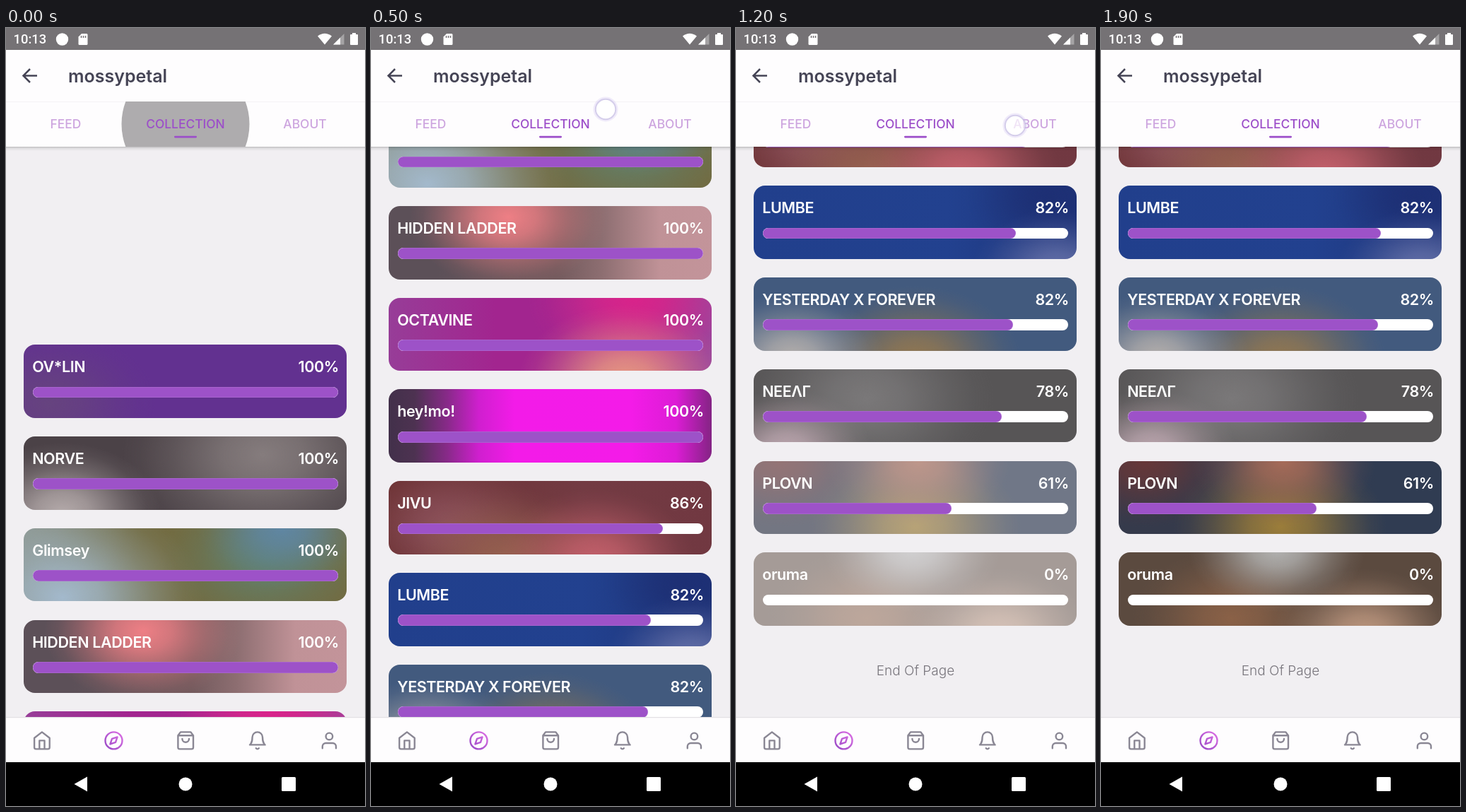
An HTML page for the animation above (2 s loop, 508x1101 px).

```html
<!DOCTYPE html>
<html lang="en">
<head>
<meta charset="utf-8">
<title>Collection</title>
<style>
  html, body { margin: 0; width: 100%; height: 100%; overflow: hidden; background: #f1eff2; }
  body { position: relative; font-family: Inter, sans-serif; }
  #list { position: absolute; left: 0; top: 0; width: 508px; }
  .card { position: absolute; left: 25.2px; width: 457.3px; height: 103.6px; color: #fff; font: 600 21.5px/30px Inter, sans-serif; letter-spacing: -.4px; }
  .card > * { position: absolute; }
  .art { inset: 0; border-radius: 16px; }
  .name { left: 12px; top: 16px; white-space: pre; }
  .percent { right: 11.5px; top: 16px; }
  .track, .fill { left: 12.5px; top: 59.3px; width: 432.6px; height: 15.8px; border-radius: 8px; }
  .track { background: #fff; }
  .fill { background: #9d52c8; box-shadow: inset 0 0 0 .6px rgba(255, 255, 255, .2); }
  #end { position: absolute; width: 508px; top: 2028px; text-align: center; font: 300 19px/30px Inter, sans-serif; color: #77747b; }
  svg { position: absolute; left: 0; top: 0; }
  .icon { fill: none; stroke: #8a8794; stroke-width: 2; stroke-linecap: round; stroke-linejoin: round; }
  .tab { font: 500 17.4px Inter, sans-serif; text-anchor: middle; fill: #cda5df; }
</style>
</head>
<body>
<div id="list"></div>
<svg width="508" height="1101" viewBox="0 0 508 1101">
  <defs>
    <linearGradient id="shade" x2="0" y2="1">
      <stop stop-opacity=".22"/><stop offset=".35" stop-opacity=".08"/><stop offset="1" stop-opacity="0"/>
    </linearGradient>
    <linearGradient id="violet" x1="0" y1="1" x2="1" y2="0">
      <stop stop-color="#9748c5"/><stop offset="1" stop-color="#dd70e4"/>
    </linearGradient>
    <clipPath id="tabClip"><path d="M0 104H508V168H0z"/></clipPath>
  </defs>

  <!-- status bar -->
  <path fill="#757275" d="M0 0H508V31H0z"/>
  <g fill="#fff">
    <text x="10.5" y="22.3" style="font:500 18.4px Roboto,sans-serif">10:13</text>
    <circle cx="79.5" cy="16" r="8.7"/>
    <path d="M107 8h7q1.5 0 1.5 1.5v13q0 1.5-1.5 1.5h-10q-1.5 0-1.5-1.5v-10z"/>
    <path d="M441 11.5Q451 4 461 11.5L451 23.5z"/>
    <path fill-opacity=".35" d="M478.5 8V23.5H463z"/>
    <path d="M473 13.5V23.5H463z"/>
    <path d="M490 7h5v2h2q1 0 1 1v13q0 1-1 1h-9q-1 0-1-1v-13q0-1 1-1h2z"/>
  </g>
  <path stroke="#757275" stroke-width="1.5" d="M106.5 11v3M109.5 11v3M112.5 11v3"/>

  <!-- header and tabs -->
  <path fill="#fefdfe" d="M0 31H508V168H0z"/>
  <path fill="#f5f3f6" d="M0 104H508V105H0z"/>
  <path fill="url(#shade)" d="M0 168H508V174H0z"/>
  <path fill="none" stroke="#454455" stroke-width="2.5" d="M44 67.5H25M34 58l-9.5 9.5 9.5 9.5"/>
  <text x="88" y="77" fill="#454455" style="font:600 25px Inter,sans-serif">mossypetal</text>
  <circle id="ripple" cx="254" cy="136" r="90.5" fill="#aeacae" clip-path="url(#tabClip)"/>
  <text class="tab" x="84.5" y="142">FEED</text>
  <text class="tab" x="254" y="142" style="fill:#9c4ec9">COLLECTION</text>
  <text class="tab" x="423" y="142">ABOUT</text>
  <rect x="238" y="152.8" width="32" height="2.6" rx="1.3" fill="#9c4ec9"/>

  <!-- bottom navigation -->
  <path fill="#fefdfe" d="M0 976H508V1039H0z"/>
  <path fill="#e2e0e4" d="M0 975H508V976.2H0z"/>
  <g class="icon">
    <path transform="translate(36.5 994) scale(1.2)" d="M3 9l9-7 9 7v11a2 2 0 0 1-2 2H5a2 2 0 0 1-2-2zM9 22V12h6v10"/>
    <path transform="translate(138.1 994) scale(1.2)" stroke="url(#violet)" d="M2 12a10 10 0 1 0 20 0a10 10 0 1 0-20 0M16.2 7.8l-2.1 6.3-6.3 2.1 2.1-6.3z"/>
    <path transform="translate(239.8 994) scale(1.2)" d="M6 2L3 6v14a2 2 0 0 0 2 2h14a2 2 0 0 0 2-2V6l-3-4zM3 6h18M16 10a4 4 0 0 1-8 0"/>
    <path transform="translate(341.4 994) scale(1.2)" d="M18 8A6 6 0 0 0 6 8c0 7-3 9-3 9h18s-3-2-3-9M13.7 21a2 2 0 0 1-3.4 0"/>
    <path transform="translate(443 994) scale(1.2)" d="M20 21v-2a4 4 0 0 0-4-4H8a4 4 0 0 0-4 4v2M8 7a4 4 0 1 0 8 0a4 4 0 1 0-8 0"/>
  </g>
  <path d="M0 1039H508V1101H0z"/>
  <path fill="#fff" d="M96.5 1070L115 1059.5V1080.5z"/>
  <circle cx="254" cy="1070" r="9.5" fill="#fff"/>
  <rect x="390" y="1060" width="20" height="20" rx="1.5" fill="#fff"/>

  <g id="touch">
    <circle r="16" fill="none" stroke="#cdbfee" stroke-opacity=".3" stroke-width="3"/>
    <circle r="14.2" fill="#fff" fill-opacity=".7" stroke="#c4bce2" stroke-opacity=".7" stroke-width="2"/>
  </g>
</svg>
<script>
const $ = id => document.getElementById(id);

// name, progress, base background, then soft blobs as "x% y% radius colour"
const groups = [
  ["OV*LIN", 1, "#623190", "8 80 150 #66437f"],
  ["NORVE", 1, "#4b4247", "12 105 140 #b5abab", "74 25 200 #857c7d"],
  ["Glimsey", 1, "#726b41", "80 0 120 #5f86a3", "75 40 150 #61806c", "12 95 200 #a3b9cc", "0 0 170 #8a938a"],
  ["HIDDEN LADDER", 1, "linear-gradient(90deg,#5c5058 15%,#735a5d 52%,#8d6e71 66%,#c09297 84%,#c3949a)", "37 15 140 #ee7f85"],
  ["OCTAVINE", 1, "linear-gradient(90deg,#973d98,#a2258f 33%,#a2258f 50%,#ab3492 80%,#9c459c)", "73 115 150 #e89a80", "76 0 150 #d9238a"],
  ["hey!mo!", 1, "linear-gradient(90deg,#42304a,#4d3251 8%,#872a88 18%,#d01fcf 28%,#f31be8 39%,#f41be8 75%,#dc1cd5 89%,#842484)"],
  ["JIVU", .868, "linear-gradient(90deg,#6a3031,#733b43 60%,#713841)", "64 108 140 #c3606b", "36 105 140 #95604f", "18 60 140 #8b505a"],
  ["LUMBE", .829, "linear-gradient(90deg,#213f8c,#22418f 60%,#1e3479)", "94 115 120 #6470a8", "92 15 120 #1d2f74"],
  ["YESTERDAY X FOREVER", .82, "#425a7e", "12 110 130 #b5b0ad", "50 115 150 #94784f"],
  ["NEE\u039b\u0393", .781, "#575556", "10 112 120 #bda7b0", "35 40 180 #7a7879"],
  ["PLOVN", .619, "linear-gradient(90deg,#353a4b 20%,#303c52 80%)", "51 0 130 #a66b58", "50 90 150 #9b7d3a", "8 0 130 #663738"],
  ["oruma", 0, "#5b4a3f", "49 -5 125 #b3b3b2", "76 112 130 #bd977f", "35 90 140 #8a6147"],
];

const blob = spec => {
  const [x, y, r, color] = spec.split(" ");
  return `radial-gradient(${r}px ${r * .72}px at ${x}% ${y}%,${color},${color}c8 28%,${color}50 64%,${color}14 86%,${color}00)`;
};

$("list").innerHTML = groups.map(([name, progress, base, ...blobs], i) => {
  const layers = [...blobs.map(blob), base].join();
  return `<div class="card" style="top:${448.4 + i * 129.75}px">
    <div class="art" style="background:${layers}"></div>
    <span class="name">${name}</span><span class="percent">${Math.floor(progress * 100)}%</span>
    <div class="track"></div><div class="fill" style="width:${432.6 * progress}px"></div></div>`;
}).join("") + '<div id="end">End Of Page</div>';

const cards = [...document.querySelectorAll(".card")];
const pressedCard = cards[6];
const lateArt = [10, 11].map(i => cards[i].firstElementChild);

// keys are [time, value] pairs, joined linearly and held at the ends
const track = (...keys) => t => {
  const next = keys.findIndex(([time]) => time > t);
  if (next < 0) return keys[keys.length - 1][1];
  if (!next) return keys[0][1];
  const [t0, a] = keys[next - 1], [t1, b] = keys[next];
  return a + (b - a) * (t - t0) / (t1 - t0);
};

// two swipes: a quick drag, then the list glides to rest; the second one reaches the end
const scroll = track([100, 0], [200, 190], [300, 435], [400, 544], [500, 585.7], [600, 613], [700, 629],
  [900, 640], [1000, 805], [1100, 1015], [1200, 1133.3]);
const touchX = track([100, 310], [300, 327], [500, 332], [700, 332], [800, 366], [1000, 382], [1200, 395]);
const touchY = track([100, 705], [200, 470], [300, 248], [400, 150], [500, 115], [700, 115], [800, 605],
  [900, 595], [1000, 358], [1100, 190], [1200, 138]);
const touchAlpha = track([0, 0], [100, 1], [500, 1], [600, .5], [700, .12], [800, 0], [900, 1],
  [1200, 1], [1300, .5], [1400, .12], [1500, 0]);
const rippleAlpha = track([0, 1], [200, 0]);
const pressAlpha = track([800, 1], [900, .8], [1000, .51], [1200, 1]);
const artAlpha = [track([1000, 0], [1300, 1]), track([1050, 0], [1350, 1])];

function draw(now) {
  const t = Math.floor(now % 2000 / 100) * 100;
  $("list").style.top = `${-scroll(t)}px`;
  $("touch").setAttribute("transform", `translate(${touchX(t)} ${touchY(t)})`);
  $("touch").setAttribute("opacity", touchAlpha(t));
  $("ripple").setAttribute("opacity", rippleAlpha(t));
  for (const part of pressedCard.children) part.style.opacity = pressAlpha(t);
  lateArt.forEach((art, i) => art.style.opacity = artAlpha[i](t));
}

const start = performance.now();
(function loop() {
  draw(performance.now() - start);
  requestAnimationFrame(loop);
})();
</script>
</body>
</html>
```
